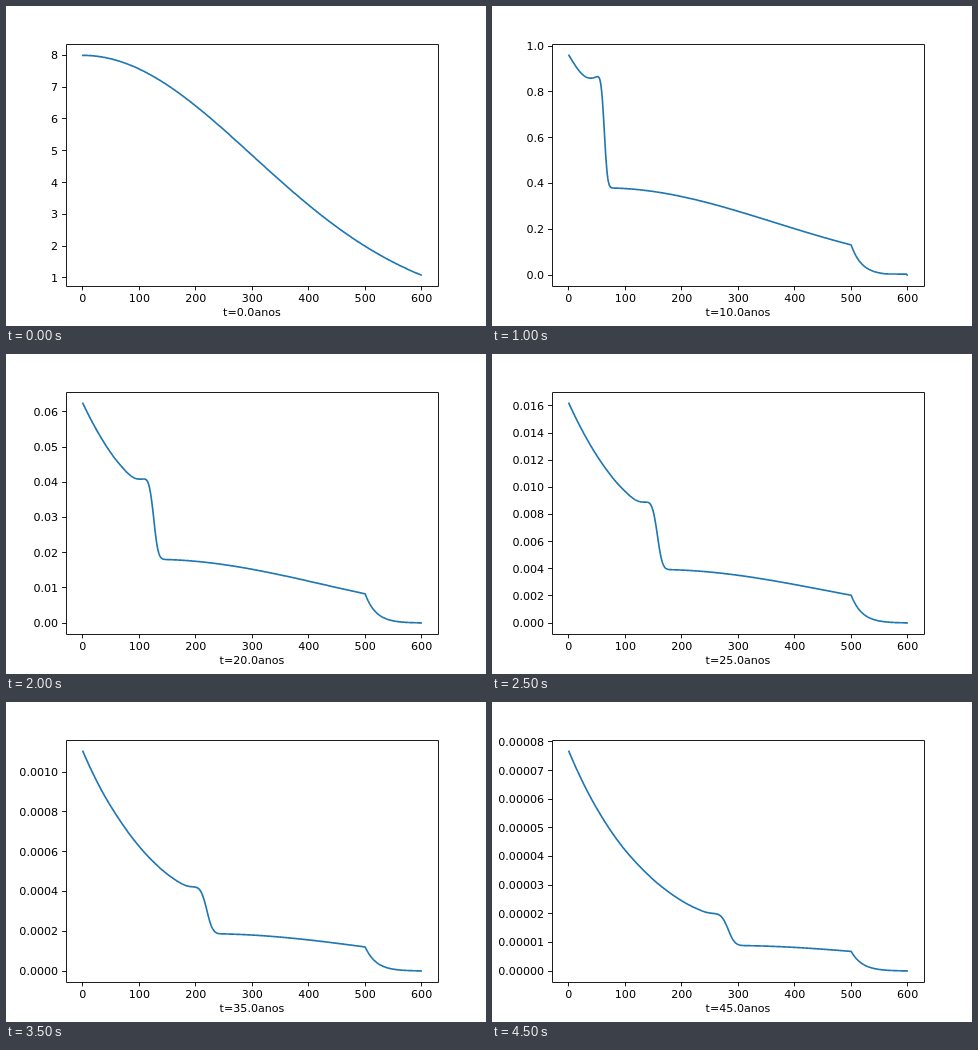
Animation of 480 by 320 pixels, one loop 5 s. Source, as an HTML page:

```html
<!DOCTYPE html>
<html lang="pt">
<head>
<meta charset="utf-8">
<title>Perfil ao longo do tempo</title>
<style>
  html, body { margin: 0; width: 100%; height: 100%; overflow: hidden; background: #fff; }
  svg { display: block; width: 480px; height: 320px; }
  text { font: 11.11px "DejaVu Sans", sans-serif; fill: #000; }
  .axis { fill: none; stroke: #000; stroke-width: 0.89; }
  .curve { fill: none; stroke: #1f77b4; stroke-width: 1.667; stroke-linecap: square; stroke-linejoin: round; }
</style>
</head>
<body>
<svg id="plot" viewBox="0 0 480 320"></svg>
<script>
const svg = document.getElementById('plot');
const BOX = { left: 60, right: 432, top: 38.4, bottom: 280 };
const POINTS = 600, STEP_MS = 500, STEPS = 10, YEARS = 5;
const SPEED = 6.25, DECAY = 0.3046, OUTLET = 500, OUTLET_DECAY = 0.048;

// Inflow strength every 5 years, with one extra knot at each end
const INFLOW = [22.2, 18.85, 18.16, 20.17, 23.4, 27.6, 32.84, 39.15, 47.1, 56.8, 68.8, 83.5];

function inflow(age) {
  const u = Math.max(0, age) / 5;
  const i = Math.min(Math.floor(u), INFLOW.length - 4);
  const f = u - i;
  const [a, b, c, d] = INFLOW.slice(i, i + 4);
  return b + f / 2 * (c - a + f * (2 * a - 5 * b + 4 * c - d + f * (3 * (b - c) + d - a)));
}

const normalCdf = z => 1 / (1 + Math.exp(-1.5976 * z - 0.07056 * z ** 3));

// Advected, decaying profile with a front that spreads as sqrt(t)
function level(x, t) {
  if (t > 0 && x === POINTS - 1) return 0;
  const s = x - SPEED * t;
  const behind = t > 0 ? normalCdf(-s / (1.45 * Math.sqrt(t))) : 0;
  const start = 8 * Math.exp(-s * s / 180000);
  const mix = start + behind * (inflow(-s / SPEED) - start);
  const past = Math.min(Math.max(0, x - OUTLET), SPEED * t);
  return mix * Math.exp(-DECAY * t - OUTLET_DECAY * past);
}

function tickStep(range) {
  const base = 10 ** Math.floor(Math.log10(range / 9));
  return base * [1, 2, 2.5, 5, 10].find(m => range / (m * base) <= 9);
}

const snap = v => Math.floor(v) + 0.5;
const label = (x, y, anchor, str) => `<text x="${x}" y="${y}" text-anchor="${anchor}">${str}</text>`;

function draw(t) {
  const data = Array.from({ length: POINTS }, (_, x) => level(x, t));
  const min = Math.min(...data), max = Math.max(...data);
  const pad = (max - min) * 0.05;
  const low = min - pad, high = max + pad;
  const xScale = (BOX.right - BOX.left) / 1.1 / (POINTS - 1);
  const px = x => BOX.left + (BOX.right - BOX.left) / 22 + x * xScale;
  const py = v => BOX.bottom - (v - low) / (high - low) * (BOX.bottom - BOX.top);

  let axis = 'M60.5 38.5H432.5V280.5H60.5Z', labels = '';
  for (let x = 0; x <= 600; x += 100) {
    axis += `M${snap(px(x))} 280.5v3.9`;
    labels += label(px(x).toFixed(2), 296, 'middle', x);
  }
  const step = tickStep(high - low);
  const digits = Math.max(0, -Math.floor(Math.log10(step) + 1e-9));
  for (let i = Math.ceil(low / step); i * step <= high; i++) {
    const y = py(i * step);
    axis += `M60.5 ${snap(y)}h-4.4`;
    labels += label(52.2, Math.round(y + 4), 'end', (i * step).toFixed(digits));
  }
  labels += label(246, 310, 'middle', `t=${t.toFixed(1)}anos`);

  const line = data.map((v, x) => `${px(x).toFixed(2)},${py(v).toFixed(2)}`).join(' ');
  svg.innerHTML = `<polyline class="curve" points="${line}"/><path class="axis" d="${axis}"/>${labels}`;
}

const begin = performance.now();
let shown = -1;

function update() {
  const step = Math.floor((performance.now() - begin) / STEP_MS) % STEPS;
  if (step !== shown) {
    shown = step;
    draw(step * YEARS);
  }
  requestAnimationFrame(update);
}
update();
</script>
</body>
</html>
```
